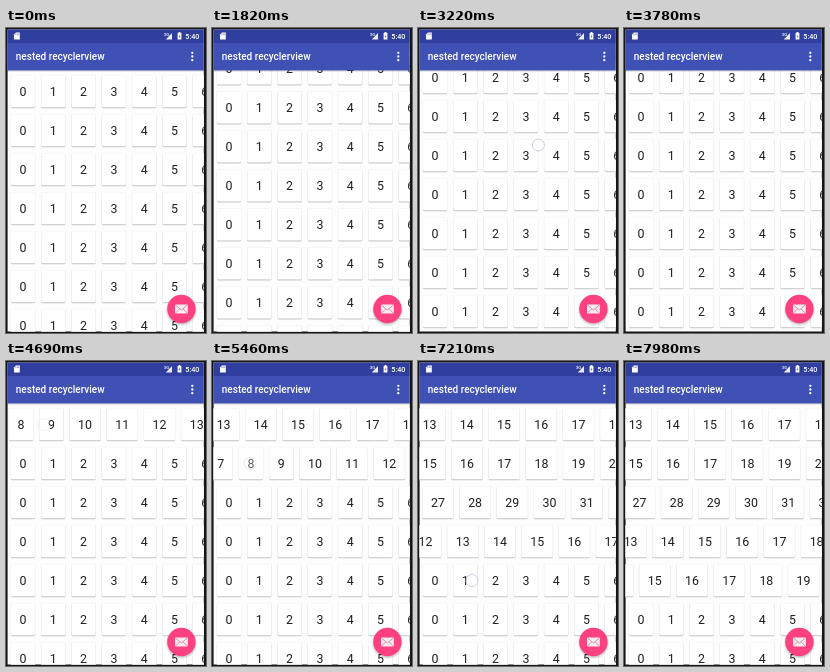
Animation, 200 px wide and 305 px high, one loop 8000 ms. Source, as an HTML page:

```html
<!DOCTYPE html>
<html lang="en">
<head>
<meta charset="utf-8">
<title>nested recyclerview</title>
<style>
  html, body { margin: 0; width: 100%; height: 100%; overflow: hidden; background: #161616; }
  svg { display: block; width: 200px; height: 305px; font-family: Roboto, "Noto Sans", sans-serif; }
  .num { font-size: 12.4px; fill: #1f1f1f; text-anchor: middle; }
  .title { font-size: 10px; font-weight: 500; fill: #fff; }
  .clock { font-size: 7.2px; font-weight: 500; fill: #fff; }
</style>
</head>
<body>
<svg viewBox="0 0 200 305">
  <defs>
    <clipPath id="screen"><rect x="1.6" y="1.5" width="196.2" height="302.1"/></clipPath>
    <linearGradient id="drop" x2="0" y2="1">
      <stop stop-color="#000" stop-opacity=".22"/>
      <stop offset="1" stop-color="#000" stop-opacity="0"/>
    </linearGradient>
    <radialGradient id="halo">
      <stop offset=".82" stop-color="#000" stop-opacity=".22"/>
      <stop offset="1" stop-color="#000" stop-opacity="0"/>
    </radialGradient>
  </defs>
  <rect width="200" height="305" fill="#161616"/>
  <g clip-path="url(#screen)">
    <rect width="200" height="305" fill="#fdfdfd"/>
    <g id="list"></g>
    <path id="glow" d="M1 42H198Q100 60 1 42Z" fill="#3f51b5" opacity="0"/>
    <rect y="42" width="200" height="2.5" fill="url(#drop)"/>
    <rect y="15" width="200" height="27.4" fill="#3f51b5"/>
    <rect width="200" height="15" fill="#303f9f"/>

    <g fill="#fff">
      <path d="M10 4.5h3.8v7H8V6.5z"/>
      <path d="M166 5v6.6h-6.2z" opacity=".9"/>
      <path d="M171.6 5h1v-1h1.8v1h1v6.6h-3.8z"/>
      <circle cx="186.3" cy="24.8" r="1.15"/>
      <circle cx="186.3" cy="28.5" r="1.15"/>
      <circle cx="186.3" cy="32.2" r="1.15"/>
    </g>
    <path d="M9.8 5.5v1.6M11.3 5.5v1.6M12.7 5.5v1.6" stroke="#303f9f" stroke-width=".5"/>
    <path d="M173.8 6.3l-1.1 2.3h.9l-.4 1.8 1.2-2.4h-.9z" fill="#303f9f"/>
    <text x="157.8" y="7.8" font-size="4.2" font-weight="500" fill="#fff">3G</text>
    <text class="clock" x="179.3" y="10.6">5:40</text>
    <text class="title" x="9.8" y="32.3">nested recyclerview</text>

    <circle cx="175.4" cy="282.3" r="16" fill="url(#halo)"/>
    <circle cx="175.4" cy="281" r="14.2" fill="#ff4081"/>
    <rect x="169" y="276.4" width="12.8" height="9.2" rx=".8" fill="#f9ebf0"/>
    <path d="M169.4 277l6 5 6-5M169.4 285.2l4.3-4.3M181.4 285.2l-4.3-4.3" fill="none" stroke="#c07f95" stroke-width=".8"/>

    <circle id="touch" r="6" fill="#fff" fill-opacity=".55" stroke="#c6c8dc" stroke-width=".9" opacity="0"/>
  </g>
</svg>
<script>
const LOOP = 8000, TICK = 70, PITCH = 39, DRAG = 140;
const $ = id => document.getElementById(id);
const list = $('list'), glow = $('glow'), touch = $('touch');

function add(parent, tag, attrs, text) {
  const el = document.createElementNS('http://www.w3.org/2000/svg', tag);
  for (const k in attrs) el.setAttribute(k, attrs[k]);
  if (text !== undefined) el.textContent = text;
  return parent.appendChild(el);
}

const centre = k => k < 10 ? 17 + 30.3 * k : 323.4 + 37.2 * (k - 10);

function makeRow(i) {
  const row = add(list, 'g', {});
  const top = 47.3 + PITCH * i;
  for (let k = 0; k < (i < 5 ? 34 : 8); k++) {
    const c = centre(k), w = k < 10 ? 24 : 31, x = c - w / 2;
    add(row, 'rect', { x: x - .4, y: top - .2, width: w + .8, height: 33.2, rx: 1.4, fill: '#e8e8e8' });
    add(row, 'rect', { x: x, y: top + .8, width: w, height: 32.1, rx: 1.2, fill: '#d2d2d2' });
    add(row, 'rect', { x: x, y: top, width: w, height: 31.8, rx: 1, fill: '#fff' });
    add(row, 'text', { class: 'num', x: c, y: top + 20.7 }, k);
  }
  return row;
}
const rows = Array.from({ length: 8 }, (_, i) => makeRow(i));

// start, distance, fling time, share covered after 350 ms, touch path
const swipe = (i, start, dist, fling, mid = .58) =>
  ({ start, dist, fling, mid, from: [54, 63.5 + PITCH * i], to: [38, 63.5 + PITCH * i], hold: 420 });
const drag = (start, dist, fling, y0, y1) =>
  ({ start, dist, fling, mid: .58, from: [120.4, y0], to: [120.4, y1], hold: 280 });

const swipes = [
  swipe(0, 4340, 423.4, 1000, .577),
  swipe(1, 5180, 497.6, 1500),
  swipe(2, 5880, 940.4, 4000),
  swipe(3, 6580, 428.4, 930),
  swipe(4, 7210, 499.4, 1200)
];
const drags = [
  drag(1470, 308.3, 560, 205, 160),
  drag(2380, 329.7, 630, 205, 160),
  drag(3220, -680, 900, 117, 165)
];
const gestures = [...drags, ...swipes];

// Short finger drag, then a decelerating fling
function travel(g, t) {
  const u = t - g.start;
  if (u <= 0) return 0;
  if (u <= DRAG) return g.dist * .06 * (u / DRAG) ** 2;
  const n = Math.log((1 - g.mid) / .94) / Math.log(1 - 210 / g.fling);
  const left = Math.max(0, 1 - (u - DRAG) / g.fling);
  return g.dist * (1 - .94 * left ** n);
}

function showTouch(t) {
  const g = gestures.find(g => t >= g.start && t < g.start + g.hold);
  if (!g) return touch.setAttribute('opacity', 0);
  const u = t - g.start, p = Math.min(1, u / 210);
  touch.setAttribute('cx', g.from[0] + (g.to[0] - g.from[0]) * p);
  touch.setAttribute('cy', g.from[1] + (g.to[1] - g.from[1]) * p);
  touch.setAttribute('opacity', u <= DRAG ? 1 : 1 - (u - DRAG) / (g.hold - DRAG));
}

function draw(time) {
  const t = Math.floor(time / TICK) * TICK;
  const y = Math.max(0, drags.reduce((sum, g) => sum + travel(g, t), 0));
  list.setAttribute('transform', `translate(0 ${-(y % PITCH)})`);
  swipes.forEach((g, i) => rows[i].setAttribute('transform', `translate(${-travel(g, t)} 0)`));
  glow.setAttribute('opacity', t >= 3920 && t < 4130 ? .12 * (4130 - t) / 210 : 0);
  showTouch(t);
}

const begin = performance.now();
function loop() {
  draw((performance.now() - begin) % LOOP);
  requestAnimationFrame(loop);
}
loop();
</script>
</body>
</html>
```
